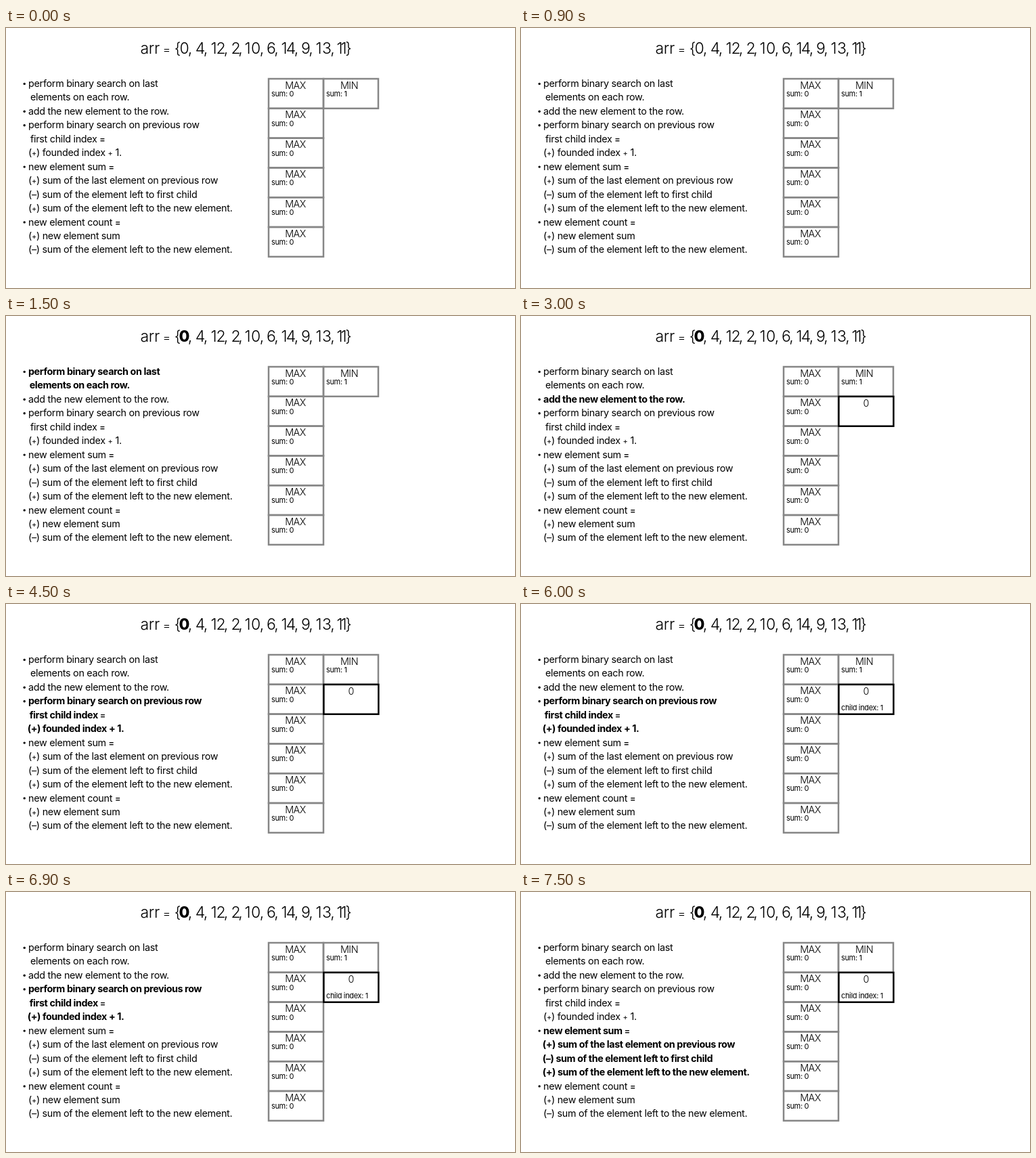
An HTML page that plays this animation: 752 px wide and 384 px high, repeating every 8000 ms.

```html
<!DOCTYPE html>
<html lang="en">
<head>
<meta charset="utf-8">
<title>Binary search rows</title>
<style>
html, body { margin: 0; width: 100%; height: 100%; overflow: hidden; background: #fff; }
svg { display: block; width: 100%; height: 100%; }
text { font-family: Inter, Lato, sans-serif; font-weight: 300; fill: #000; white-space: pre; }
.line { font-size: 14.3px; font-weight: 400; letter-spacing: -0.27px; }
.bold { font-weight: 700; letter-spacing: -0.4px; }
.eq { font-size: 12.5px; font-weight: 600; }
.line:not(.bold) .plus { font-size: 11px; }
.title { font-size: 23px; }
.mid { text-anchor: middle; }
.cap { font-size: 14.4px; letter-spacing: -0.5px; }
.small { font-size: 11px; font-weight: 400; letter-spacing: -0.35px; }
rect { fill: none; stroke: #868686; stroke-width: 2.5; }
</style>
</head>
<body>
<svg id="stage" viewBox="0 0 752 384"></svg>
<script>
const stage = document.getElementById('stage');
const LOOP = 8000, STEP = 1500, ROW = 43.8, COL = 81;

function add(tag, attrs, content = '', parent = stage) {
  const el = document.createElementNS('http://www.w3.org/2000/svg', tag);
  for (const key in attrs) el.setAttribute(key, attrs[key]);
  el.textContent = content;
  parent.append(el);
  return el;
}
const label = (x, y, cls, content) => add('text', { x, y, class: cls }, content);

// Title: glyph centres follow the tight spacing around the digit 1.
label(198.5, 38, 'title', 'arr').style.letterSpacing = '-0.3px';
const glyphs = '={0,4,12,2,10,6,14,9,13,11}';
const centres = [237.5, 253.5, 263.5, 272, 287, 295, 307, 317.5, 325, 339.5, 346.5,
  357, 369, 378, 392, 399.5, 411, 421, 429, 443, 450.5, 462, 474, 482.5, 493, 499, 506];
const title = [...glyphs].map((g, i) => label(centres[i], 38, 'title mid', g));
const zero = title[2];
title[0].style.fontSize = '18px';

// Each step: first line of a bullet, then its continuation lines.
const steps = [
  ['perform binary search on last', 'elements on each row.'],
  ['add the new element to the row.'],
  ['perform binary search on previous row', 'first child index =', '(+) founded index + 1.'],
  ['new element sum =', '(+) sum of the last element on previous row',
    '(–) sum of the element left to first child',
    '(+) sum of the element left to the new element.'],
  ['new element count =', '(+) new element sum',
    '(–) sum of the element left to the new element.']
];
const signs = { '=': 'eq', '+': 'plus' };
let row = 0;
const groups = steps.map(lines => lines.map((content, i) => {
  const y = 87 + 20.45 * row++;
  if (!i) add('circle', { cx: 27.2, cy: y - 4.6, r: 1.7 });
  const x = i && content[0] !== '(' ? 36 : 33;
  const el = label(x, y, 'line', '');
  for (const part of content.split(/([=+])/)) {
    add('tspan', { class: signs[part] || '' }, part, el);
  }
  return { el, x, boldX: i ? x - 1.3 : x };
}));

function cell(x, y, attrs = {}) {
  return add('rect', { x, y, width: COL, height: ROW, ...attrs });
}
for (let i = 0; i < 6; i++) {
  const y = 75 + i * ROW;
  cell(388, y);
  label(427.5, y + 14.6, 'cap mid', 'MAX');
  label(392, y + 26, 'small', 'sum: 0');
}
cell(388 + COL, 75);
label(507, 89.6, 'cap mid', 'MIN');
label(473, 101, 'small', 'sum: 1');

const added = [
  cell(469.4, 118.9, { style: 'stroke:#000' }),
  label(509.7, 133.6, 'cap mid', '0')
];
const child = label(473, 157, 'small', 'child index: 1');

const active = [-1, 0, 1, 2, 2, 3];
const show = (el, on) => el.setAttribute('visibility', on ? 'visible' : 'hidden');

function draw(ms) {
  const phase = Math.floor((ms % LOOP) / STEP);
  zero.style.fontWeight = phase > 0 ? 800 : 300;
  groups.forEach((lines, i) => lines.forEach(({ el, x, boldX }) => {
    const on = i === active[phase];
    el.setAttribute('class', on ? 'line bold' : 'line');
    el.setAttribute('x', on ? boldX : x);
  }));
  added.forEach(el => show(el, phase > 1));
  show(child, phase > 3);
}

const start = performance.now();
function tick() {
  draw(performance.now() - start);
  requestAnimationFrame(tick);
}
tick();
</script>
</body>
</html>
```
